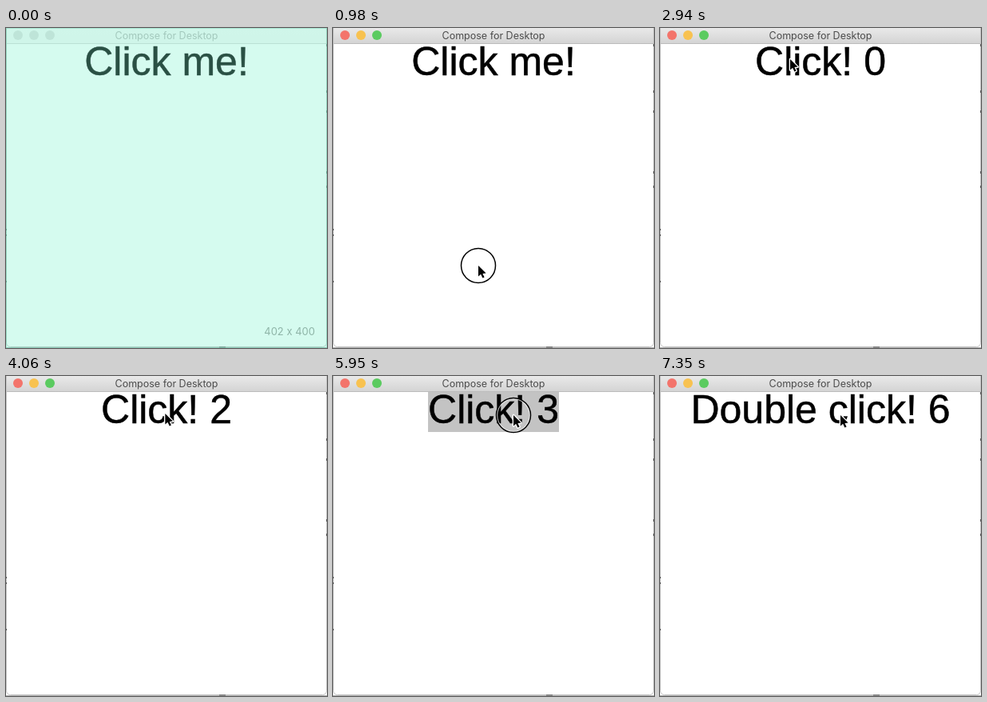
An HTML page with a canvas that plays this animation: 402x400 px, repeating every 8 s.

```html
<!DOCTYPE html>
<html lang="en">
<head>
<meta charset="utf-8">
<title>Click counter</title>
<style>
html, body { margin: 0; width: 100%; height: 100%; overflow: hidden; background: #fff; }
canvas { display: block; }
</style>
</head>
<body>
<canvas id="stage" width="402" height="400"></canvas>
<script>
const ctx = document.getElementById('stage').getContext('2d');
const LOOP = 8000, STEP = 70;
const HOLD = 140;    // how long a press ring stays
const REST = 280;    // pause before the pointer leaves a stop
const SINGLE = 490;  // a single click is confirmed this late
const UI = 'Inter, Roboto, sans-serif';
const BIG = '50px "Liberation Sans", Arial, sans-serif';

// The pointer enters at the first stop and presses at all the others.
const stops = [
  { at: 420, x: 175, y: 311 },
  { at: 980, x: 182, y: 297 },
  { at: 2030, x: 211, y: 47 },
  { at: 2800, x: 163, y: 39 },
  { at: 3570, x: 172, y: 45 },
  { at: 4480, x: 226, y: 49 }
];
const doubles = [{ first: 5390, second: 5950 }, { first: 7070, second: 7210 }];
const activated = stops[1].at;
const presses = [...stops.slice(1).map(s => s.at), ...doubles.flatMap(d => [d.first, d.second])];

const during = (t, from, length) => t >= from && t < from + length;

function labelAt(t) {
  const [a, b] = doubles.map(d => d.second + HOLD);
  if (t >= b) return 'Double click! 6';
  if (t >= a + 420) return 'Click! 5';
  if (t >= a) return 'Double click! 4';
  const count = stops.slice(2).filter(s => t >= s.at + SINGLE).length;
  return count ? 'Click! ' + (count - 1) : 'Click me!';
}

function pointerAt(t) {
  const i = stops.findLastIndex(s => t >= s.at);
  const from = stops[i], to = stops[i + 1] || from;
  const dx = to.x - from.x, dy = to.y - from.y;
  const travel = Math.min(700, 200 + 4 * Math.hypot(dx, dy));
  const k = Math.min(1, Math.max(0, (t - from.at - REST) / travel));
  const ease = k * k * (3 - 2 * k);
  return [from.x + dx * ease, from.y + dy * ease];
}

function rect(color, x, y, w, h) {
  ctx.fillStyle = color;
  ctx.fillRect(x, y, w, h);
}

function text(str, x, y, font, color, align = 'center') {
  ctx.font = font;
  ctx.textAlign = align;
  ctx.fillStyle = color;
  ctx.fillText(str, x, y);
}

function circle(x, y, r, fill, stroke, width = 1) {
  ctx.beginPath();
  ctx.arc(x, y, r, 0, Math.PI * 2);
  if (fill) { ctx.fillStyle = fill; ctx.fill(); }
  if (stroke) { ctx.strokeStyle = stroke; ctx.lineWidth = width; ctx.stroke(); }
}

function drawWindow(active) {
  rect('#fff', 0, 0, 402, 400);
  const bar = ctx.createLinearGradient(0, 0, 0, 19);
  bar.addColorStop(0, active ? '#e9e9e9' : '#f7f7f7');
  bar.addColorStop(1, active ? '#d4d4d4' : '#f5f5f5');
  rect(bar, 0, 0, 402, 19);
  rect(active ? '#bcbcbc' : '#d6d6d6', 0, 19, 402, 1);

  ctx.beginPath();
  ctx.roundRect(0.5, -5, 401, 403.5, 5);
  ctx.strokeStyle = '#c4c4c4';
  ctx.lineWidth = 1;
  ctx.stroke();

  // slivers of the desktop behind the window
  rect('#b4b4b4', 0, 399, 402, 1);
  rect('#888', 267, 398, 8, 2);
  for (const y of [251, 258, 316]) rect('#555', 0, y, 1, 2);
  for (const y of [20, 78, 103, 179, 197]) rect('#555', 401, y, 1, 3);

  const lights = active ? ['#f3746b', '#f8c250', '#5bcb60'] : Array(3).fill('#dddddd');
  lights.forEach((color, i) => circle(15 + 20 * i, 9, 6, color));
  text('Compose for Desktop', 201, 14, '12.5px ' + UI, active ? '#4c4c4c' : '#b4b4b4');
}

function drawLabel(str) {
  text(str, 201, 59, BIG, '#000');
  // slightly heavier stems
  ctx.strokeStyle = '#000';
  ctx.lineWidth = 0.5;
  ctx.strokeText(str, 201, 59);
}

function drawPointer(x, y) {
  ctx.save();
  ctx.translate(x, y);
  ctx.beginPath();
  [[0, 0], [0, 13.5], [3.1, 10.8], [5.4, 15.6], [7.6, 14.6], [5.4, 9.9], [9.6, 9.6]]
    .forEach(p => ctx.lineTo(...p));
  ctx.closePath();
  ctx.lineJoin = 'round';
  ctx.strokeStyle = '#fff';
  ctx.lineWidth = 2.6;
  ctx.stroke();
  ctx.fillStyle = '#000';
  ctx.fill();
  ctx.restore();
}

function drawSelection() {
  rect('rgba(127,243,206,.33)', 0, 0, 402, 400);
  ctx.strokeStyle = 'rgba(110,205,175,.4)';
  ctx.lineWidth = 1;
  ctx.strokeRect(0.5, 0.5, 401, 399);
  text('402 x 400', 387, 384, '13px ' + UI, '#8fb5a8', 'right');
}

function draw(now) {
  const t = Math.floor((now % LOOP) / STEP) * STEP;
  drawWindow(t >= activated);
  if (doubles.some(d => during(t, d.second, HOLD))) rect('#c3c3c3', 119, 20, 164, 50);
  drawLabel(labelAt(t));

  if (t >= stops[0].at) {
    const [x, y] = pointerAt(t);
    if (presses.some(at => during(t, at, HOLD))) {
      circle(x, y, 20.5, null, 'rgba(255,255,255,.75)', 1.5);
      circle(x, y, 21.5, null, '#000', 1.5);
    }
    drawPointer(x, y);
  }
  if (t < STEP) drawSelection();
}

const start = performance.now();
function tick() {
  draw(performance.now() - start);
  requestAnimationFrame(tick);
}
tick();
</script>
</body>
</html>
```
